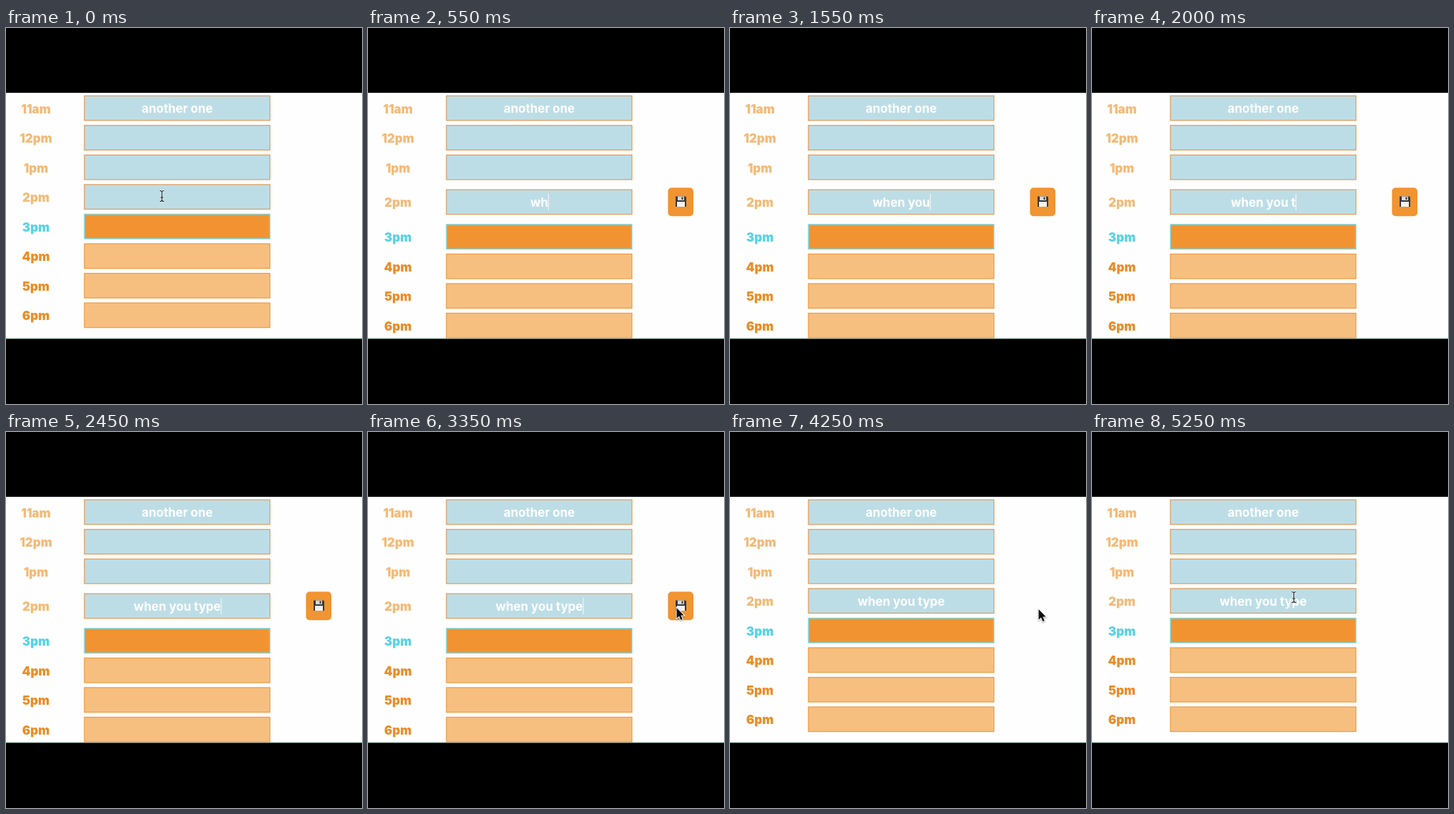
These frames come from a looping animation (500 px wide and 528 px high, 5.3 s). An HTML page with a canvas:

```html
<!DOCTYPE html>
<html>
<head>
<meta charset="utf-8">
<style>
  html, body { margin: 0; width: 100%; height: 100%; overflow: hidden; background: #000; }
  canvas { display: block; }
</style>
</head>
<body>
<canvas id="stage" width="500" height="528"></canvas>
<script>
const ctx = document.getElementById('stage').getContext('2d');
const LOOP = 5300, OPEN = 250, SAVE = 3600;
const TYPE_START = 360, KEY_GAP = 165;
const NOTE = 'when you type';
const TYPE_END = TYPE_START + KEY_GAP * (NOTE.length - 1);
const HOURS = ['11am', '12pm', '1pm', '2pm', '3pm', '4pm', '5pm', '6pm'];
const PAST = { label: '#f3bb78', fill: '#bddde6', edge: '#e09a58' };
const NOW = { label: '#55d3ea', fill: '#f19330', edge: '#86cfcb' };
const NEXT = { label: '#eb8d26', fill: '#f6bf7f', edge: '#ee9a3e' };

// Pointer stops: time, x, y
const PATH = [
  [0, 219, 236], [2550, 219, 236], [3100, 433.5, 247], [3650, 433.5, 247],
  [3900, 433.5, 249], [4500, 433.5, 249], [5150, 283.5, 232], [LOOP, 283.5, 232]
];

function rect(x, y, w, h, color) {
  ctx.fillStyle = color;
  ctx.fillRect(x, y, w, h);
}

function text(str, x, y, weight, color) {
  ctx.font = `${weight} 17px Inter, sans-serif`;
  ctx.textAlign = 'center';
  ctx.fillStyle = color;
  ctx.fillText(str, x, y);
}

function pointerAt(t) {
  const i = Math.max(1, PATH.findIndex(p => p[0] > t));
  const [t0, x0, y0] = PATH[i - 1], [t1, x1, y1] = PATH[i];
  const p = (t - t0) / (t1 - t0), e = p * p * (3 - 2 * p);
  return [x0 + (x1 - x0) * e, y0 + (y1 - y0) * e];
}

function drawIBeam(x, y) {
  const beam = new Path2D('M-3-7.5Q0-7.5 0-5.5Q0-7.5 3-7.5M0-5.5V5.5M-3 7.5Q0 7.5 0 5.5Q0 7.5 3 7.5M-2 2H2');
  ctx.save();
  ctx.translate(x, y);
  ctx.lineWidth = 2.6;
  ctx.strokeStyle = '#ffffffcc';
  ctx.stroke(beam);
  ctx.lineWidth = 1.2;
  ctx.strokeStyle = '#222';
  ctx.stroke(beam);
  ctx.restore();
}

function drawArrow(x, y) {
  const arrow = new Path2D('M0 0V14.5L3.5 11.4L5.8 17L8.2 16L5.9 10.6H10.2Z');
  ctx.save();
  ctx.translate(x, y);
  ctx.shadowColor = '#0005';
  ctx.shadowBlur = 2;
  ctx.shadowOffsetY = 1;
  ctx.lineWidth = 2;
  ctx.strokeStyle = '#fff';
  ctx.stroke(arrow);
  ctx.shadowColor = 'transparent';
  ctx.fillStyle = '#111';
  ctx.fill(arrow);
  ctx.restore();
}

function drawSaveButton() {
  ctx.fillStyle = '#f19432';
  ctx.beginPath();
  ctx.roundRect(421.3, 224.2, 35.7, 40, 5);
  ctx.fill();
  ctx.fillStyle = '#35393d';
  ctx.fill(new Path2D('M432 236.5H446L447 237.5V251H432Z'));
  rect(435, 236.5, 9, 5.5, '#d5d9dc');
  rect(440.5, 237.5, 2, 3.5, '#35393d');
  rect(434, 244, 11, 7, '#f1f2f2');
}

function drawRow(i, editing) {
  const style = i < 4 ? PAST : i === 4 ? NOW : NEXT;
  const shift = !editing || i < 3 ? 0 : i === 3 ? 7.2 : 14.4;
  const y = 94.6 + i * 41.55 + shift;
  text(HOURS[i], 42, y + 25, 900, style.label);
  rect(109.5, y, 261.8, 35.8, style.edge);
  const b = i === 4 ? 1.6 : 1.2;
  rect(109.5 + b, y + b, 261.8 - 2 * b, 35.8 - 2 * b, style.fill);
  return y;
}

function draw(t) {
  const editing = t >= OPEN && t < SAVE;
  rect(0, 0, 500, 528, '#000');
  rect(0, 91, 500, 345, '#fefefe');
  rect(0, 435.5, 500, 1, '#a9cfc6');

  const tops = HOURS.map((_, i) => drawRow(i, editing));
  text('another one', 240.5, tops[0] + 24.5, 700, '#fff');

  const count = Math.max(0, Math.floor((t - TYPE_START) / KEY_GAP) + 1);
  const typed = NOTE.slice(0, count);
  text(typed, 240.5, tops[3] + 24.5, 700, '#fff');
  if (editing) {
    drawSaveButton();
    const caretOn = t < TYPE_END || Math.floor((t - TYPE_END) / 500) % 2 === 0;
    const caretX = 240.5 + ctx.measureText(typed).width / 2;
    if (caretOn) rect(caretX, tops[3] + 6.5, 1, 23, '#f4fafb');
  }

  // The pointer hides while keys are pressed.
  if (t < TYPE_START || t >= 2550) {
    const [x, y] = pointerAt(t);
    (x < 371 ? drawIBeam : drawArrow)(x, y);
  }
}

const start = performance.now();
function frame() {
  draw((performance.now() - start) % LOOP);
  requestAnimationFrame(frame);
}
frame();
</script>
</body>
</html>
```
